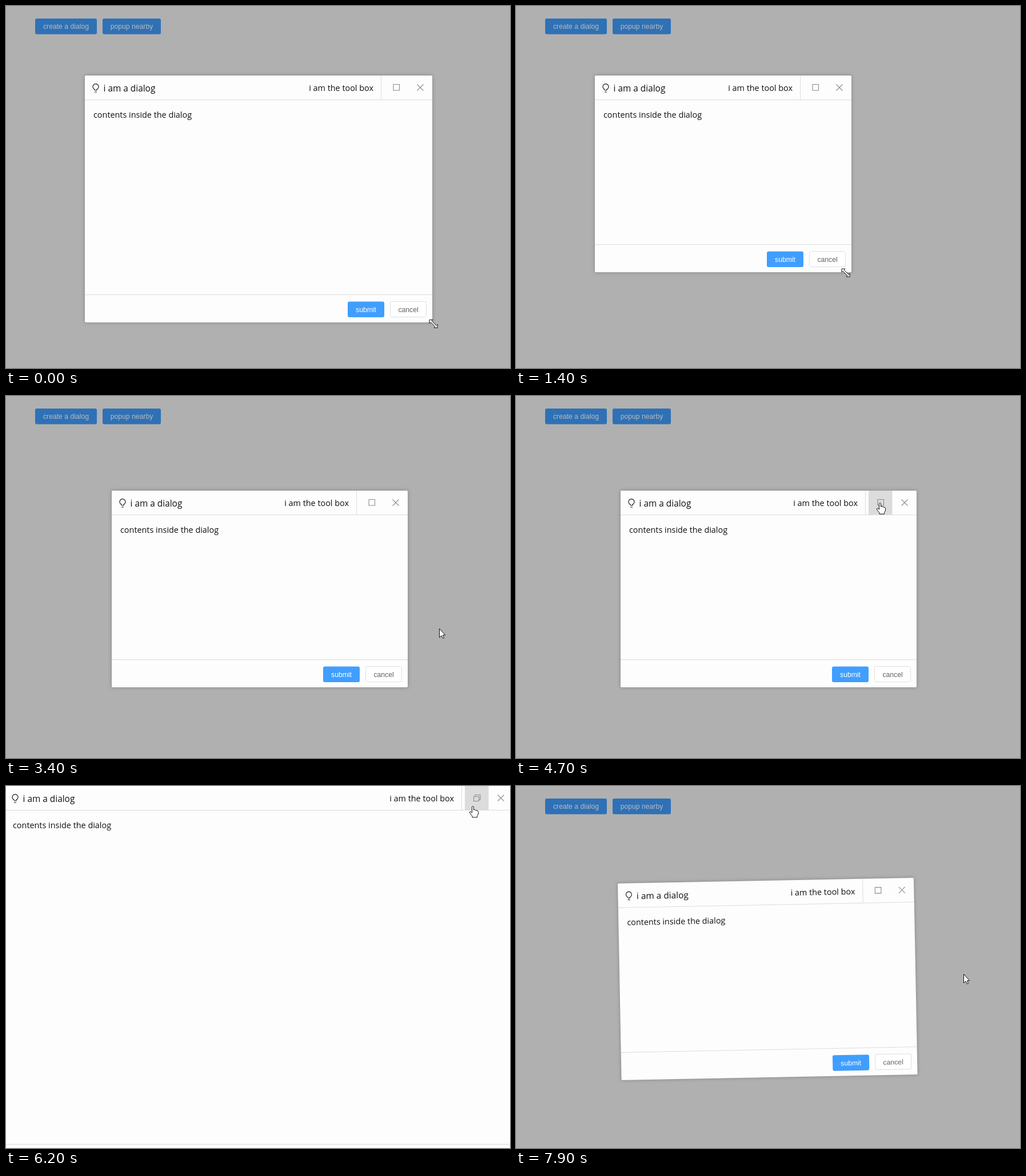
These frames come from a looping animation (882 px wide and 635 px high, 8000 ms). An HTML page:

```html
<!DOCTYPE html>
<html lang="en">
<head>
<meta charset="utf-8">
<title>Dialog demo</title>
<style>
  html, body { margin: 0; width: 100%; height: 100%; overflow: hidden; background: #b0b0b0; }
  svg { display: block; }
  .ui { font: 14.4px "Open Sans", "Noto Sans", sans-serif; fill: #111; }
  .title { font-size: 15.4px; }
  .btn { font: 12.2px "Liberation Sans", Arial, sans-serif; text-anchor: middle; }
  .dim { fill: #2e71b6; }
  .line { stroke: #dcdcdc; fill: none; }
  .icon { stroke: #8c8c8c; fill: none; stroke-width: 1.1; }
  #panel { fill: #fdfdfd; filter: drop-shadow(0 0 3px rgba(0, 0, 0, .25)); }
  #pointer { fill: #fff; stroke: #111; stroke-linejoin: round; }
</style>
</head>
<body>
<svg width="882" height="635" viewBox="0 0 882 635">
  <rect class="dim" x="51" y="22" width="108" height="27.5" rx="3"/>
  <rect class="dim" x="169" y="22" width="102" height="27.5" rx="3"/>
  <g class="btn" fill="#bababa">
    <text x="105" y="40">create a dialog</text>
    <text x="220" y="40">popup nearby</text>
  </g>

  <g id="dialog">
    <rect id="panel" rx="2"/>
    <path id="rules" class="line"/>
    <path d="M17.3 25.5V24.4A5 5 0 1 1 20.7 24.4V26H17.3M17 29H21" fill="none" stroke="#222" stroke-width="1.2"/>
    <text class="ui title" x="32.5" y="28">i am a dialog</text>
    <text class="ui" x="15" y="73.5">contents inside the dialog</text>
    <g id="right">
      <text class="ui" x="-103" y="27" text-anchor="end">i am the tool box</text>
      <path class="line" d="M-89.5 0V42"/>
      <rect id="hover" x="-84" width="41.5" height="42" fill="#dcdcdc"/>
      <path id="sizer" class="icon"/>
      <path class="icon" d="M-26.5 15.5l11 11m0-11l-11 11"/>
    </g>
    <g id="corner" class="btn">
      <rect x="-148" y="-36.5" width="64" height="27.5" rx="3" fill="#409eff"/>
      <text x="-116" y="-18.2" fill="#fff">submit</text>
      <rect x="-73.5" y="-36.5" width="63" height="27" rx="3" fill="#fff" stroke="#dcdfe6"/>
      <text x="-42" y="-18.2" fill="#606266">cancel</text>
    </g>
  </g>

  <path id="pointer"/>
</svg>
<script>
const $ = id => document.getElementById(id);
const set = (id, attrs) => { for (const k in attrs) $(id).setAttribute(k, attrs[k]); };
const move = (x, y) => `translate(${x} ${y})`;
const ramp = (t, from, to) => Math.min(1, Math.max(0, (t - from) / (to - from)));
const easeOut = p => 1 - (1 - p) ** 3;

const shapes = {
  arrow: 'M.5 0V15.5L4 12.4 6.4 17.2 8.6 16.2 6.3 11.4H10.6Z',
  nwse: 'M-7-7h6l-2 2 8 8 2-2v6h-6l2-2-8-8-2 2z',
  ew: 'M-10 0l4-4v3h12v-3l4 4-4 4v-3h-12v3z',
  hand: 'M-1.5 1.5Q0-1 1.5 1.5V7Q4 5.5 4.5 7.5Q7 6.5 7 8.5Q9.5 8 9.5 10.5V14L7.5 17.5V20H-1V18L-5.5 12Q-6 9.5-3.5 10.2L-1.5 12Z'
};

// Each mouse move: start, end, destination
const trips = [
  [600, 1110, 577, 468],   // drag the corner
  [1600, 2300, 666, 403],  // to the right edge
  [2500, 2900, 735, 407],  // drag the edge
  [3000, 3300, 758, 408],
  [3400, 4300, 637, 187],  // to the maximize button
  [5300, 6100, 817, 35],   // to the restore button
  [6500, 7600, 783, 330]
];

function mouse(t) {
  let x = 748, y = 557.5;
  for (const [from, to, tx, ty] of trips) {
    const p = ramp(t, from, to);
    x += (tx - x) * p;
    y += (ty - y) * p;
  }
  return [x, y];
}

function box(t, full) {
  if (full) return [-3, 0, 890, 677];
  // After each resize the dialog glides back to the centre
  const first = easeOut(ramp(t, 1500, 2000)), second = easeOut(ramp(t, 3100, 3600));
  return [
    138 + 80 * first - 35 * second,
    122 + 44 * first,
    608 - 159 * ramp(t, 600, 1110) + 69 * ramp(t, 2500, 2900),
    433 - 88 * ramp(t, 600, 1170)
  ].map(Math.round);
}

function draw(t) {
  const full = t >= 4800 && t < 6500;
  const [x, y, w, h] = box(t, full);
  const [mx, my] = mouse(t);

  const shake = t > 7700 ? Math.cos(t * Math.PI / 100) : 0;
  set('dialog', {
    transform: `${move(x + 1.7 * shake, y)} rotate(${1.1 * shake} ${w / 2} ${h / 2})`
  });
  set('panel', { width: w, height: h });
  set('rules', { d: `M0 42.5H${w}M0 ${h - 48.5}H${w}` });
  set('right', { transform: move(w, 0) });
  set('corner', { transform: move(w, h) });
  set('sizer', {
    d: full ? 'M-68.5 18.5h9v8h-9zM-66 18.5v-3h9v8.5h-2.5' : 'M-68 15.5h10.5v10.5h-10.5z'
  });

  const gap = x + w - mx;
  const over = gap > 42.5 && gap < 84 && my > y && my < y + 42;
  const kind = t < 1600 ? 'nwse' : t >= 2300 && t < 3100 ? 'ew' : over ? 'hand' : 'arrow';
  set('hover', { visibility: over ? 'visible' : 'hidden' });
  set('pointer', { d: shapes[kind], transform: move(mx, my) });
}

const start = performance.now();
function tick() {
  const ms = (performance.now() - start) % 8000;
  draw(Math.floor(ms / 100) * 100);
  requestAnimationFrame(tick);
}
tick();
</script>
</body>
</html>
```
